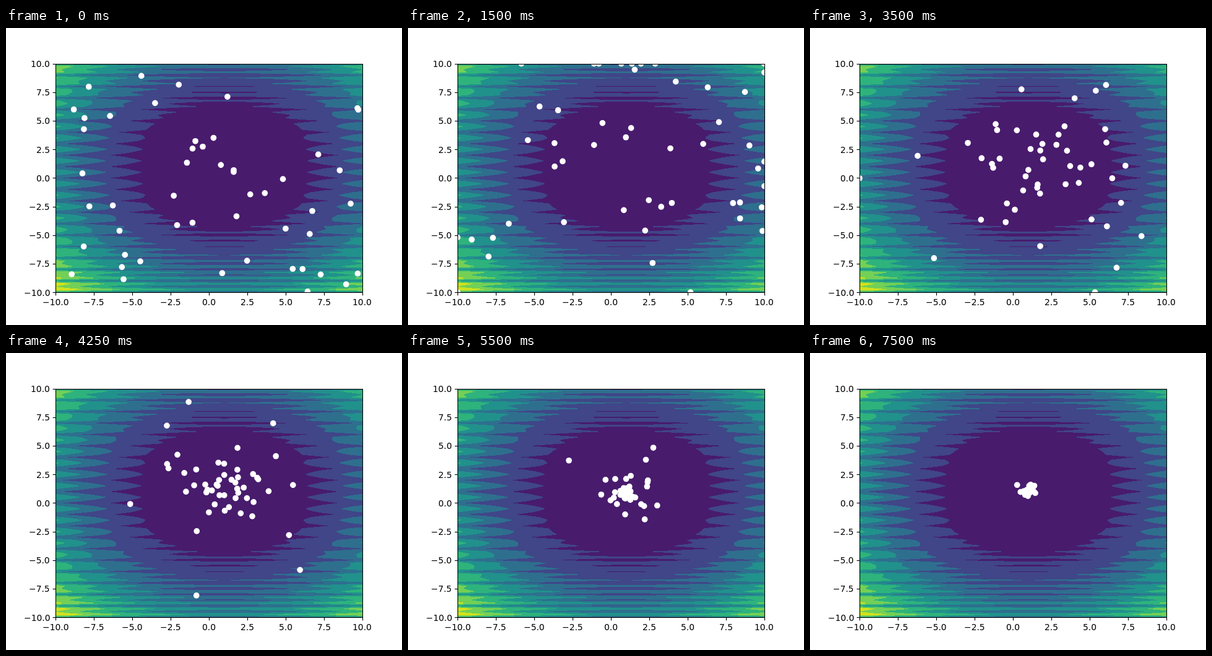
Write an HTML page with a canvas that moves like this. It is 640 px wide and 480 px high and loops after 7.75 s.

```html
<!DOCTYPE html>
<html lang="en">
<head>
<meta charset="utf-8">
<title>Swarm on a contour plot</title>
<style>
  html, body { margin: 0; width: 100%; height: 100%; overflow: hidden; background: #fff; }
  canvas { display: block; }
</style>
</head>
<body>
<canvas id="stage" width="640" height="480"></canvas>
<script>
const LOOP = 7750, STEP = 250;
const LEFT = 80, TOP = 57.6, WIDTH = 496, HEIGHT = 369.6;
const UNIT_X = WIDTH / 20, UNIT_Y = HEIGHT / 20;
const BANDS = [[72, 27, 109], [64, 70, 136], [46, 111, 142], [33, 145, 140],
               [46, 179, 124], [115, 208, 86], [210, 226, 27]];
const BAND_SIZE = 60;
const COUNT = 50;

const ctx = document.getElementById('stage').getContext('2d');
const toPxX = x => LEFT + (x + 10) * UNIT_X;
const toPxY = y => TOP + (10 - y) * UNIT_Y;
const toX = px => (px - LEFT) / UNIT_X - 10;
const toY = py => 10 - (py - TOP) / UNIT_Y;
const clamp = v => Math.max(-10, Math.min(10, v));

let seed = 20;
function random() {
  seed = (seed * 1664525 + 1013904223) % 4294967296;
  return seed / 4294967296;
}
const between = (a, b) => a + (b - a) * random();

function levy(x, y) {
  const sin2 = v => Math.sin(v * Math.PI) ** 2;
  return sin2(3 * x) + (x - 1) ** 2 * (1 + sin2(3 * y)) + (y - 1) ** 2 * (1 + sin2(2 * y));
}

// The coarse grid folds the fast waves of the function into wide lobes.
const CELLS = 80;
const field = Array.from({ length: CELLS + 1 }, (_, j) =>
  Array.from({ length: CELLS + 1 }, (_, i) => levy(i / 4 - 10, j / 4 - 10)));

function sample(x, y) {
  const u = (clamp(x) + 10) * 4, v = (clamp(y) + 10) * 4;
  const i = Math.min(CELLS - 1, Math.floor(u)), j = Math.min(CELLS - 1, Math.floor(v));
  const mix = (a, b, t) => a + (b - a) * t;
  return mix(mix(field[j][i], field[j][i + 1], u - i),
             mix(field[j + 1][i], field[j + 1][i + 1], u - i), v - j);
}

// Bands are painted upwards and fill every pixel they touch, so the highest value wins.
function pixelPeak(px, py) {
  let peak = 0;
  for (let dy = 0; dy <= 1; dy += 0.25) {
    const y = toY(py + dy);
    peak = Math.max(peak, sample(toX(px), y), sample(toX(px + 1), y));
  }
  return peak;
}

function makeContours() {
  const top = 58, rows = 369;
  const layer = document.createElement('canvas');
  layer.width = 640;
  layer.height = 480;
  const pen = layer.getContext('2d');
  pen.fillStyle = '#fff';
  pen.fillRect(0, 0, 640, 480);
  const image = pen.createImageData(WIDTH, rows);
  for (let r = 0, p = 0; r < rows; r++) {
    for (let c = 0; c < WIDTH; c++, p += 4) {
      const band = Math.floor(pixelPeak(LEFT + c, top + r) / BAND_SIZE);
      image.data.set([...BANDS[Math.min(band, BANDS.length - 1)], 255], p);
    }
  }
  pen.putImageData(image, LEFT, top);
  return layer;
}

// One axis of a particle: it swings around the minimum at 1 and stops at the border.
function swing() {
  const speed = between(0.5, 1);
  const a = between(-10, 10) - 1, b = between(-12, 12);
  return (step, fade) => clamp(1 + fade * (a * Math.cos(speed * step) + b * Math.sin(speed * step)));
}

const particles = Array.from({ length: COUNT }, () =>
  ({ x: swing(), y: swing(), life: between(11, 19) }));

function drawSwarm(step) {
  ctx.save();
  ctx.beginPath();
  ctx.rect(LEFT, TOP, WIDTH, HEIGHT);
  ctx.clip();
  ctx.fillStyle = '#fff';
  for (const p of particles) {
    const fade = 1 / (1 + (step / p.life) ** 6);
    ctx.beginPath();
    ctx.arc(toPxX(p.x(step, fade)), toPxY(p.y(step, fade)), 4.85, 0, 2 * Math.PI);
    ctx.fill();
  }
  ctx.restore();
}

function line(x1, y1, x2, y2) {
  ctx.beginPath();
  ctx.moveTo(x1, y1);
  ctx.lineTo(x2, y2);
  ctx.stroke();
}

// Aligns the inked part of the text; `share` of its width lies left of the anchor.
function drawLabel(text, anchor, baseline, share) {
  const box = ctx.measureText(text);
  const ink = box.actualBoundingBoxLeft + box.actualBoundingBoxRight;
  ctx.fillText(text, Math.round(anchor - ink * share + box.actualBoundingBoxLeft), baseline);
}

function drawAxes() {
  ctx.strokeStyle = ctx.fillStyle = '#000';
  ctx.lineWidth = 1.11;
  ctx.strokeRect(80.5, 58.5, 496, 369);
  ctx.font = '13.889px "DejaVu Sans", sans-serif';
  for (let v = -10; v <= 10; v += 2.5) {
    const label = v.toFixed(1).replace('-', '\u2212');
    const x = Math.round(toPxX(v)) + 0.5, y = Math.round(toPxY(v)) + 0.5;
    line(x, 427.5, x, 432.4);
    line(75.6, y, 80.5, y);
    drawLabel(label, toPxX(v), 448, 0.5);
    drawLabel(label, 70.3, Math.round(toPxY(v) + 5.3), 1);
  }
}

const contours = makeContours();
let origin = null;

function render(now) {
  if (origin === null) origin = now;
  const step = Math.floor(((now - origin) % LOOP) / STEP);
  ctx.drawImage(contours, 0, 0);
  drawSwarm(step);
  drawAxes();
  requestAnimationFrame(render);
}
requestAnimationFrame(render);
</script>
</body>
</html>
```
